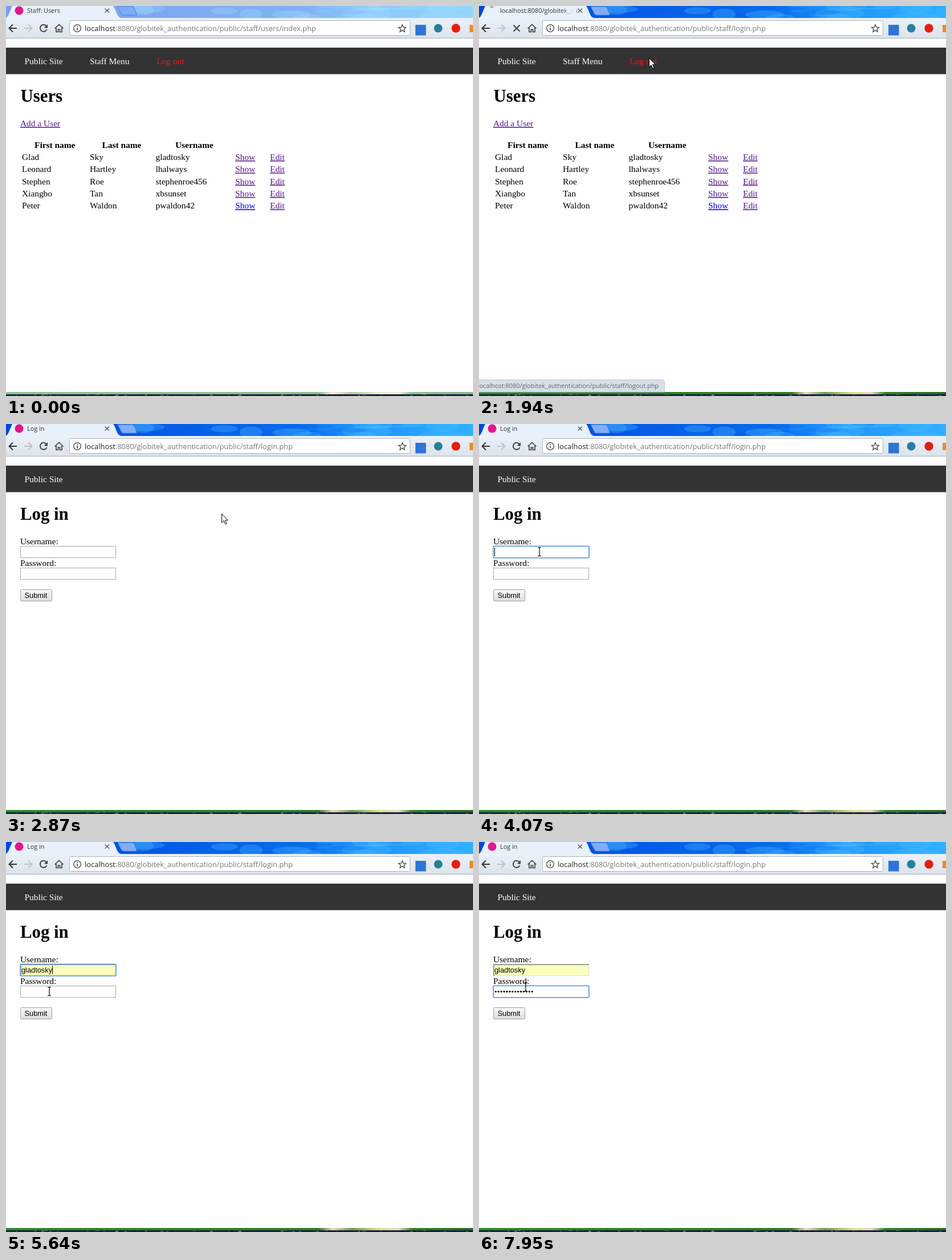
Recreate the animation shown at these times as an HTML page. Size 819 px wide and 684 px high, loop 8 s.

```html
<!DOCTYPE html>
<html lang="en">
<head>
<meta charset="utf-8">
<title>Log in demo</title>
<style>
html, body { margin: 0; width: 100%; height: 100%; overflow: hidden; background: #fff; }
svg { display: block; width: 819px; height: 684px; }
.page { font: 15.4px "Liberation Serif", "Times New Roman", serif; }
.b { font-weight: bold; }
h1, .h1 { font-size: 30.8px; font-weight: bold; }
.link { fill: #551a8b; text-decoration: underline; }
.new { fill: #00e; }
.form { font: 12.8px "Liberation Sans", Arial, sans-serif; }
.ui { font: 10.9px "Open Sans", "Noto Sans", sans-serif; fill: #333; }
.url { font-size: 12.85px; fill: #777; }
.list { font-weight: bold; font-size: 11px; fill: #000; }
.icon { fill: none; stroke: #444; stroke-width: 2; }
.field { fill: #fff; stroke: #a9a9a9; }
.ring { fill: none; stroke: #4d90e0; stroke-width: 1.6; }
.caret { fill: #000; }
</style>
</head>
<body>
<svg viewBox="0 0 819 684">
  <defs>
    <linearGradient id="sky">
      <stop offset="0" stop-color="#0048d8"/><stop offset=".3" stop-color="#0557e6"/>
      <stop offset=".66" stop-color="#0c74f0"/><stop offset=".67" stop-color="#1685f8"/>
      <stop offset="1" stop-color="#2fb0ff"/>
    </linearGradient>
    <linearGradient id="bar" x2="0" y2="1">
      <stop offset="0" stop-color="#ebf1f9"/><stop offset="1" stop-color="#dce3eb"/>
    </linearGradient>
    <linearGradient id="grass">
      <stop offset="0" stop-color="#2a8a20"/><stop offset=".67" stop-color="#2a7c1c"/>
      <stop offset=".7" stop-color="#f0d8b8"/><stop offset=".74" stop-color="#6a9a48"/>
      <stop offset=".8" stop-color="#d8e088"/><stop offset=".84" stop-color="#e8d8b8"/>
      <stop offset=".87" stop-color="#2c8420"/><stop offset="1" stop-color="#256c18"/>
    </linearGradient>
    <linearGradient id="button" x2="0" y2="1">
      <stop offset="0" stop-color="#f8f8f8"/><stop offset="1" stop-color="#ddd"/>
    </linearGradient>
    <linearGradient id="fade"><stop offset="0" stop-color="#e8f0f9" stop-opacity="0"/><stop offset="1" stop-color="#e8f0f9"/></linearGradient>
    <clipPath id="strip"><path d="M0 0H819V21H0Z"/></clipPath>
  </defs>

  <rect width="819" height="684" fill="#fefefe"/>

  <!-- window frame -->
  <rect width="819" height="21" fill="url(#sky)"/>
  <g id="clouds" clip-path="url(#strip)"></g>
  <rect y="677" width="819" height="4" fill="url(#grass)"/>
  <g id="inactive" fill="#fff" fill-opacity=".48">
    <rect width="819" height="21"/><rect y="677" width="819" height="4"/>
  </g>
  <rect y="681" width="819" height="3" fill="#18234a"/>
  <g id="ground"></g>
  <path d="M196 1H221Q224 1 225 4L229 14Q230 16 227 16H206Q203 16 202 13L197 3Z" fill="#7fadf6" stroke="#4a7fd0"/>
  <path d="M0 21Q3 19 5 14L10 2 11 0H188L190 3 195 15Q197 20 202 21Z" fill="#e8f0f9"/>
  <rect y="21" width="819" height="35" fill="url(#bar)"/>
  <path d="M0 56.5H819" stroke="#a9b0b9"/>

  <!-- tab -->
  <g class="ui">
    <text id="tab" x="37" y="12"></text>
  </g>
  <rect x="145" width="20" height="20" fill="url(#fade)"/>
  <rect x="164" width="7" height="20" fill="#e8f0f9"/>
  <path class="icon" d="M173.500 4.500l7.500 7M181 4.500l-7.500 7" style="stroke:#555;stroke-width:1.4"/>
  <circle id="favicon" cx="23" cy="8" r="7.500" fill="#e3178b"/>
  <path id="spinner" class="icon" d="M23 1.500A6.500 6.500 0 0 1 28 4" style="stroke:#777;stroke-width:1.5"/>

  <!-- toolbar -->
  <path class="icon" d="M19 39H6M12 32.500L5.500 39 12 45.500" style="stroke:#333"/>
  <path class="icon" d="M32 39H45M39 32.500L45.500 39 39 45.500" style="stroke:#bcc3cc"/>
  <g id="reload"><path class="icon" d="M70.500 35A6 6 0 1 0 71.500 41"/><path d="M73 32V38.500H66.500Z" fill="#444"/></g>
  <path id="stop" class="icon" d="M60.500 33.500L71.500 44.500M71.500 33.500L60.500 44.500"/>
  <path class="icon" d="M85.500 39.500L93 32.500 100.500 39.500M88 38V45.500H91.500V41H94.500V45.500H98V38" style="stroke-width:1.7"/>
  <rect x="111.500" y="25.500" width="597" height="26" rx="2" fill="#fff" stroke="#adb4bd"/>
  <circle class="icon" cx="125" cy="39" r="6.300" style="stroke-width:1.3"/>
  <path d="M125 35V36.800M125 38V42.800" stroke="#444" stroke-width="1.600"/>
  <text class="ui url" x="138" y="43.500"><tspan fill="#222">localhost</tspan><tspan id="path"></tspan></text>
  <path class="icon" d="M695 32.800L696.800 37.200 701.500 37.500 697.900 40.500 699.100 45.200 695 42.600 690.900 45.200 692.100 40.500 688.500 37.500 693.200 37.200Z" style="stroke-width:1.3"/>
  <rect x="718" y="33" width="18.500" height="18.500" fill="#2d74d6"/>
  <circle cx="758" cy="39" r="7.500" fill="#287f9c"/>
  <circle cx="789" cy="39" r="7.700" fill="#e1200f"/>
  <rect x="813" y="33" width="13" height="13" fill="#f08a24"/>

  <!-- page header -->
  <g class="page">
    <rect y="73" width="819" height="46.500" fill="#333"/>
    <text x="32.500" y="102" fill="#fff">Public Site</text>
  </g>

  <g id="users" class="page">
    <text x="147" y="102" fill="#fff">Staff Menu</text>
    <text x="264" y="102" fill="#f11">Log out</text>
    <text class="h1" x="25.500" y="168">Users</text>
    <text class="link" x="25" y="211">Add a User</text>
    <g class="b">
      <text x="50" y="248.500">First name</text><text x="168.500" y="248.500">Last name</text><text x="297" y="248.500">Username</text>
    </g>
    <g id="rows"></g>
  </g>

  <g id="login">
    <g class="page">
      <text class="h1" x="25" y="168">Log in</text>
      <text x="25" y="211">Username:</text>
      <text x="25" y="249">Password:</text>
    </g>
    <g class="form">
      <rect class="field" x="25.500" y="214.500" width="167" height="20"/>
      <rect class="field" x="25.500" y="252.500" width="167" height="20"/>
      <g id="filled">
        <rect x="26" y="215" width="166" height="19" fill="#faffbd"/>
        <text x="27" y="229">gladtosky</text>
      </g>
      <g id="inset" fill="none">
        <path d="M26 234.500H192.500V215" stroke="#ddd"/>
        <path d="M25.800 235V215H193" stroke="#858585" stroke-width="1.600"/>
      </g>
      <rect id="nameRing" class="ring" x="25.200" y="214.200" width="167.600" height="20.600" rx="1"/>
      <rect id="passRing" class="ring" x="25.200" y="252.200" width="167.600" height="20.600" rx="1"/>
      <g id="dots"></g>
      <rect id="nameCaret" class="caret" y="217" width="1" height="15"/>
      <rect id="passCaret" class="caret" y="255" width="1" height="15"/>
      <rect x="25.500" y="290.500" width="55" height="20" rx="1" fill="url(#button)" stroke="#a0a0a0"/>
      <text x="32.500" y="305">Submit</text>
    </g>
    <g id="menu">
      <rect x="25.500" y="235.500" width="167" height="140.500" fill="#fff" stroke="#bbb"/>
      <rect id="pick" x="26" width="166" height="23.400" fill="#c8c8c8"/>
      <g id="choices" class="ui list"></g>
    </g>
  </g>

  <g id="status">
    <path d="M0 655.500H321Q325.500 655.500 325.500 660V677H0Z" fill="#d7dfe9" stroke="#c3ccd7"/>
    <text class="ui" x="-2" y="670" style="fill:#666">localhost:8080/globitek_authentication/public/staff/logout.php</text>
  </g>

  <g id="cursor" fill="#fff" stroke="#000" stroke-linejoin="round">
    <path id="arrow" d="M.5 .5V16L4 12.600 6.700 18.500 9 17.500 6.500 11.800H11.300Z"/>
    <path id="hand" d="M-1.500 1.500Q0 -1 1.500 1.500V7Q4 6 4.500 8 7 7 7.500 9 10 8.500 10 11V15Q10 17 8 20H0Q-2 17 -5.500 12.500-5.500 10-3.500 10.500L-1.500 12.500Z"/>
    <path id="beam" fill="none" d="M-3 -7.500H-1L0 -6.500 1 -7.500H3M0 -6.500V6.500M-3 7.500H-1L0 6.500 1 7.500H3" stroke-width="1.200"/>
  </g>
</svg>

<script>
const $ = id => document.getElementById(id);
const show = (id, on) => $(id).style.display = on ? '' : 'none';
const base = ':8080/globitek_authentication/public/staff/';

const people = [
  ['Glad', 'Sky', 'gladtosky'],
  ['Leonard', 'Hartley', 'lhalways'],
  ['Stephen', 'Roe', 'stephenroe456'],
  ['Xiangbo', 'Tan', 'xbsunset'],
  ['Peter', 'Waldon', 'pwaldon42']
];
$('rows').innerHTML = people.map((p, i) => {
  const y = 270 + 21.35 * i;
  const cells = p.map((s, c) => `<text x="${[28, 147, 262.5][c]}" y="${y}">${s}</text>`).join('');
  return cells + `<text class="link ${i == 4 ? 'new' : ''}" x="402" y="${y}">Show</text>
    <text class="link" x="463" y="${y}">Edit</text>`;
}).join('');

const choices = ['xbtan@qvo.edu', 'gladtosky', 'pwaldon42', 'xbtan', 'Dorisalways', 'lhalways'];
$('choices').innerHTML = choices.map((s, i) => `<text x="34" y="${251 + 23.35 * i}">${s}</text>`).join('');

// Wallpaper showing through the frame
let seed = 7;
const rnd = () => (seed = seed * 16807 % 2147483647) / 2147483647;
for (let i = 0; i < 22; i++) {
  const x = 240 + rnd() * 570, light = rnd() > .45;
  $('clouds').innerHTML += `<ellipse cx="${x}" cy="${rnd() * 24}" rx="${12 + rnd() * 35}" ry="${3 + rnd() * 8}"
    fill="${light ? '#4cc0ff' : '#0058e0'}" opacity="${light ? .3 : .22}"/>`;
}
for (let i = 0; i < 110; i++) {
  $('ground').innerHTML += `<rect x="${rnd() * 819}" y="${681 + rnd() * 2}" width="${1 + rnd() * 4}" height="1"
    fill="${rnd() > .5 ? '#7c8a78' : '#0b1430'}"/>`;
}

// Pointer moves: start, end, shape, from x, y, to x, y, steps
const moves = [
  [0, 0, ''],
  [370, 610, 'arrow', 324, 25, 322, 196, 3],
  [740, 860, 'arrow', 312, 150, 304, 112, 2],
  [980, 980, 'hand', 303, 94],
  [1350, 1700, 'hand', 302, 93, 300, 91, 4],
  [1940, 2060, 'arrow', 298, 91],
  [2180, 2870, 'arrow', 300, 92, 378, 157, 7],
  [2990, 3580, 'arrow', 364, 160, 104, 219, 6],
  [3700, 3820, 'beam', 107, 224, 106, 224, 2],
  [4440, 4440, 'beam', 105, 227],
  [5030, 5160, 'arrow', 95, 237, 86, 245, 2],
  [5280, 5400, 'arrow', 82, 259, 78, 270, 2],
  [5640, 5640, 'beam', 76, 262],
  [6740, 6740, ''],
  [7830, 7950, 'beam', 76, 262, 82, 254, 2]
];

function point(t) {
  const [start, end, shape, x, y, x2 = x, y2 = y, n = 1] = moves.findLast(m => t >= m[0]);
  const step = n > 1 ? Math.min(n - 1, Math.floor((t - start + 6) * (n - 1) / (end - start))) : 0;
  const p = n > 1 ? step / (n - 1) : 0;
  for (const id of ['arrow', 'hand', 'beam']) show(id, id == shape);
  if (shape) $('cursor').setAttribute('transform', `translate(${x + (x2 - x) * p} ${y + (y2 - y) * p})`);
}

function draw(t) {
  const within = (a, b) => t >= a && t < b;
  const loading = within(1940, 2180), login = t >= 2180;

  show('inactive', t < 1820);
  show('status', within(1820, 2180));
  show('users', !login);
  show('login', login);
  show('favicon', !loading);
  show('spinner', loading);
  show('reload', !loading);
  show('stop', loading);
  $('spinner').setAttribute('transform', `rotate(${t < 2060 ? -30 : 90} 23 8)`);
  $('tab').textContent = login ? 'Log in' : loading ? 'localhost' + base.slice(0, 17) : 'Staff: Users';
  $('path').textContent = base + (t < 1940 ? 'users/index.php' : 'login.php');

  show('nameRing', within(4070, 5880));
  show('nameCaret', within(4070, 4550) || within(5160, 5400) || within(5640, 5880));
  $('nameCaret').setAttribute('x', t < 5400 ? 27 : 81);
  show('menu', within(4790, 5640));
  show('pick', t >= 5030);
  $('pick').setAttribute('y', t < 5280 ? 235.5 : 258.9);
  show('filled', t >= 5400);
  show('inset', t >= 5640);

  const typed = t < 6740 ? 0 : Math.round(14 * Math.min(6, 1 + Math.floor((t - 6740) / 120)) / 6);
  $('dots').innerHTML = Array.from({ length: typed }, (_, i) =>
    `<circle cx="${29.3 + 4.92 * i}" cy="262.300" r="1.600"/>`).join('');
  show('passRing', t >= 5880);
  show('passCaret', within(5880, 6370) || within(6740, 7830));
  $('passCaret').setAttribute('x', 27 + Math.round(4.92 * typed));
  point(t);
}

function loop(now) {
  draw(now % 8000);
  requestAnimationFrame(loop);
}
draw(0);
requestAnimationFrame(loop);
</script>
</body>
</html>
```
